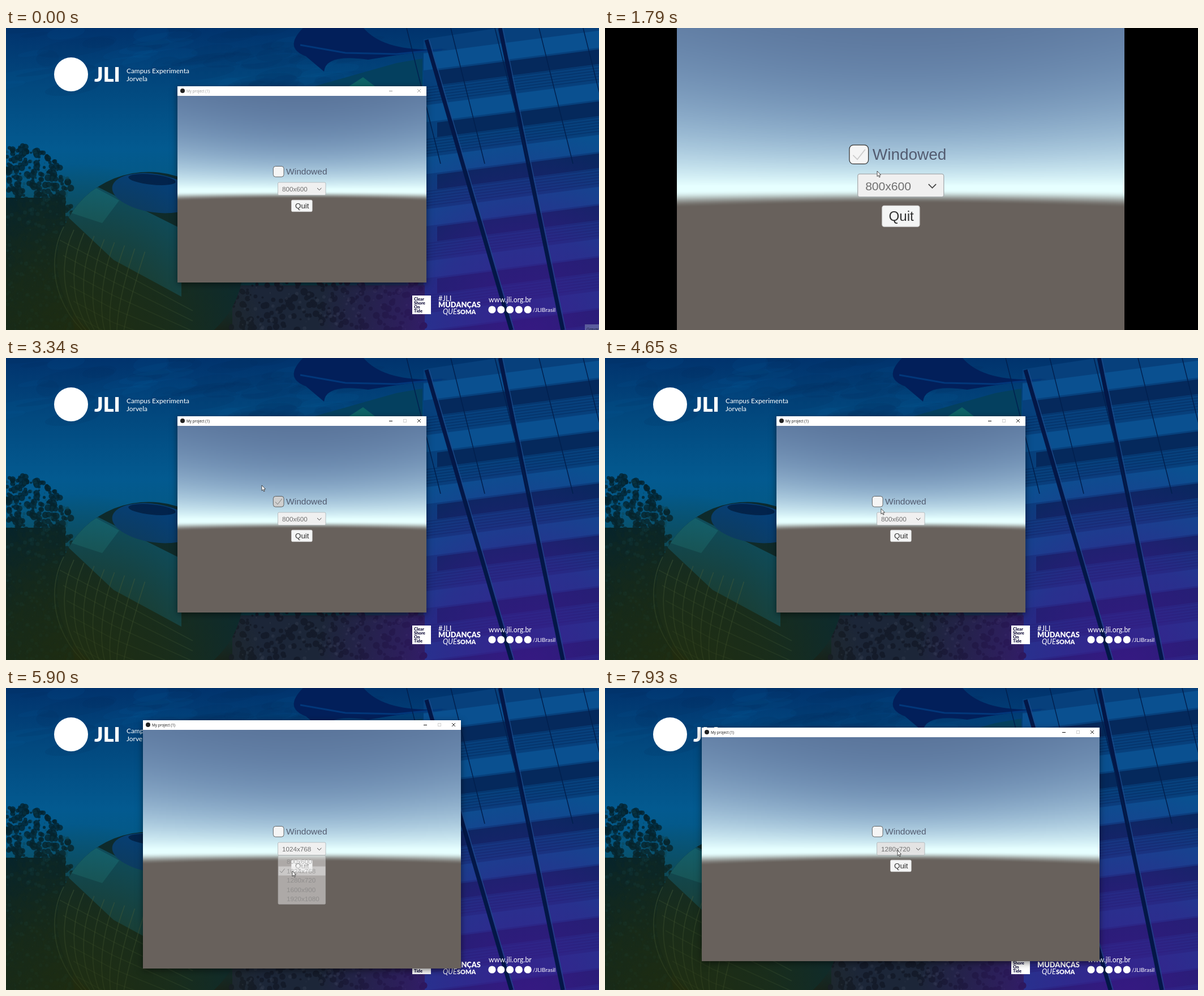
These frames come from a looping animation (1048 by 534 pixels, 8000 ms). An HTML page with a canvas:

```html
<!DOCTYPE html>
<html lang="pt-BR">
<head>
<meta charset="utf-8">
<title>Window settings demo</title>
<style>
html, body { margin: 0; width: 100%; height: 100%; overflow: hidden; background: #000; }
canvas { display: block; }
</style>
</head>
<body>
<canvas id="stage" width="1048" height="534"></canvas>
<script>
const W = 1048, H = 534, LOOP = 8000;
const CX = 522.8, CY = 284.6;      // centre of every app window
const SANS = '"Liberation Sans", Arial, sans-serif';
const LATO = 'Lato, sans-serif';
const stage = document.getElementById('stage').getContext('2d');
let c = stage;

const clamp = v => Math.max(0, Math.min(1, v));
const ramp = (t, a, b) => clamp((t - a) / (b - a));
const mix = (a, b, k) => a + (b - a) * k;
const smooth = k => k * k * (3 - 2 * k);

function text(str, x, y, font, color) {
  c.font = font;
  c.fillStyle = color;
  c.fillText(str, x, y);
}
function rect(x, y, w, h, color) {
  c.fillStyle = color;
  c.fillRect(x, y, w, h);
}
function oval(x, y, rx, ry, color, turn = 0) {
  c.fillStyle = color;
  c.beginPath();
  c.ellipse(x, y, rx, ry, turn, 0, 7);
  c.fill();
}
const disc = (x, y, r, color) => oval(x, y, r, r, color);
function trace(points) {
  c.beginPath();
  for (let i = 0; i < points.length; i += 2) c.lineTo(points[i], points[i + 1]);
}
function poly(color, ...points) {
  trace(points);
  c.fillStyle = color;
  c.fill();
}
function line(color, width, ...points) {
  trace(points);
  c.strokeStyle = color;
  c.lineWidth = width;
  c.stroke();
}
function box(x, y, w, h, r, fill, stroke) {
  c.beginPath();
  c.roundRect(x, y, w, h, r);
  c.fillStyle = fill;
  c.fill();
  c.strokeStyle = stroke;
  c.lineWidth = 0.7;
  c.stroke();
}
function shade(g, ...colors) {
  colors.forEach((color, i) => g.addColorStop(i / (colors.length - 1), color));
  return g;
}
const glow = (x, y, r, color) =>
  rect(0, 0, W, H, shade(c.createRadialGradient(x, y, 0, x, y, r), color + 'cc', color + '88', color + '00'));

// Paints once into an off-screen canvas.
function prepare(w, h, paint) {
  const canvas = document.createElement('canvas');
  canvas.width = w;
  canvas.height = h;
  c = canvas.getContext('2d');
  paint();
  c = stage;
  return canvas;
}

// ---------- desktop wallpaper ----------
let seed = 7;
const rnd = () => (seed = seed * 16807 % 2147483647) / 2147483647;

function foliage(n, x, w, top, color, size) {
  for (let i = 0; i < n; i++) {
    const u = rnd(), y = top(u);
    disc(x + u * w, mix(y, H, rnd()), size * (0.3 + rnd()), color);
  }
}

// A strip of facade that rises towards the right.
const strip = (x, y, h, color) => {
  const rise = (W - x) * 0.13;
  poly(color, x, y, W, y - rise, W, y - rise + h, x, y + h);
};

function building() {
  poly('#07407c', 738, 20, 870, 0, W, 0, W, H, 738, H);
  for (let y = 45; y < 620; y += 92) {
    strip(738, y, 30, '#0a5090');
    strip(762, y + 30, 26, '#05295c');
    for (let k = 0; k < 6; k++) strip(738, y + 60 + k * 5, 1.5, '#04285a88');
  }
}

function globe() {
  c.save();
  c.beginPath();
  c.ellipse(255, 415, 165, 160, 0.3, 0, 7);
  c.clip();
  rect(80, 240, 350, 300, '#0b2a30');
  poly('#0b5068', 150, 275, 310, 355, 310, 475, 190, 410, 105, 330);
  poly('#11667a', 150, 278, 200, 305, 170, 345, 112, 326);
  oval(262, 292, 75, 34, '#063f76', 0.15);
  oval(258, 268, 42, 9, '#02234c', 0.1);
  c.restore();
  c.lineWidth = 1.7;
  c.strokeStyle = '#5f7f6066';
  for (let i = 0; i < 9; i++) {
    c.beginPath();
    c.ellipse(255, 425, 170 - i * 19, 160, 0.3, 1.3, 3.3);
    c.stroke();
  }
  for (let i = 0; i < 6; i++) line('#5f7f6044', 1.5, 95 + i * 6, 375 + i * 27, 190, 425 + i * 24, 330, 500 + i * 18);
}

function flags() {
  poly('#04405f', 545, 103, 690, 62, 736, 54, 736, 103);
  poly('#0c6265', 606, 103, 631, 87, 652, 103);
  c.fillStyle = '#021f5a';
  c.beginPath();
  c.moveTo(525, 0);
  c.quadraticCurveTo(490, 35, 530, 50);
  c.lineTo(562, 77);
  c.quadraticCurveTo(565, 45, 640, 56);
  c.quadraticCurveTo(710, 44, 781, 37);
  c.quadraticCurveTo(670, 45, 632, 0);
  c.fill();
  line('#02377a', 3, 520, 30, 600, 44, 690, 46, 770, 38);
}

function wallpaper() {
  rect(0, 0, W, H, shade(c.createLinearGradient(0, 0, 0, H),
    '#01336d', '#02497f', '#035a90', '#04577c', '#084050', '#131f20'));
  for (let i = 0; i < 70; i++)
    oval(rnd() * 620, rnd() * 110, 20 + rnd() * 50, 4 + rnd() * 11, i % 3 ? '#01285a20' : '#08609e18', -0.15);
  building();
  flags();

  const crown = u => 207 + 75 * u ** 3;
  rect(0, 300, 105, 234, '#06242c');
  foliage(650, 0, 118, crown, '#04232fcc', 5);
  foliage(250, 0, 118, crown, '#0b404f55', 3);
  rect(400, 455, 340, 79, '#1c2638');
  foliage(200, 395, 345, () => 450, '#141b2a', 5);
  foliage(90, 395, 345, () => 450, '#38425555', 3);
  globe();

  glow(130, 570, 330, '#262f08');
  glow(920, 550, 370, '#43158c');
  for (let i = 0; i < 2; i++) {
    const x = 743 + i * 130, y = 21 - i * 21;
    line('#031747', 7, x, y, x + 150 - i * 39, H);
    line('#1c4a8a', 1.2, x + 5, y, x + 155 - i * 39, H);
  }
  for (let x = 708; x < W; x += 78) line('#02204f', 1.5, x, 0, x + 60, 240);

  branding();
}

function branding() {
  disc(115, 82, 30, '#fff');
  text('JLI', 156, 95, '900 36px ' + LATO, '#fff');
  text('Campus Experimenta', 213, 79.5, '11.9px ' + LATO, '#fff');
  text('Jorvela', 213, 94, '11.9px ' + LATO, '#fff');

  rect(718, 473, 33, 33, '#fff');
  ['Clear', 'Shore', 'On', 'Tide'].forEach((s, i) =>
    text(s, 721, 481.5 + i * 7.2, '900 7.6px ' + LATO, '#17143f'));
  text('#JLI', 764, 483, '13px ' + LATO, '#fff');
  text('MUDANÇAS', 764, 494, '900 12.8px ' + LATO, '#fff');
  text('QUE', 772, 506, 'italic 12.5px ' + LATO, '#fff');
  text('SOMA', 797, 506, '900 11px ' + LATO, '#fff');
  text('www.jli.org.br', 853, 484.5, '12.4px ' + LATO, '#fff');
  for (let i = 0; i < 5; i++) disc(859 + i * 15.8, 498, 6.6, '#fff');
  text('/JLIBrasil', 931, 501.5, '10px ' + LATO, '#fff');
}

// ---------- sky ----------
const SKY_H = 600, SPAN = 0.6;     // the column covers -SPAN..SPAN view heights

// Haze decays exponentially above the horizon; the ground is flat.
function skyColor(u) {
  const haze = (zenith, bright, decay) => mix(zenith, bright, Math.exp(Math.min(0, u) / decay));
  const k = smooth(ramp(u, 0.012, 0.052));
  return `rgb(${mix(haze(83, 230, 0.17), 104, k)},${mix(haze(105, 255, 0.2), 97, k)},${mix(haze(138, 255, 0.26), 92, k)})`;
}

const desk = prepare(W, H, wallpaper);
const column = prepare(1, SKY_H, () => {
  for (let y = 0; y < SKY_H; y++) rect(0, y, 1, 1, skyColor(mix(-SPAN, SPAN, (y + 0.5) / SKY_H)));
});

// Equal elevation angles bow away from the horizon towards the sides.
function sky(cx, cy, w, h) {
  const from = Math.round(cx - w / 2), to = Math.round(cx + w / 2), top = Math.round(cy - h / 2);
  c.save();
  c.beginPath();
  c.rect(from, top, to - from, Math.round(h));
  c.clip();
  for (let x = from; x < to; x += 4) {
    const reach = SPAN * h * Math.hypot(1, (x + 2 - cx) / (0.866 * h));
    c.drawImage(column, 0, 0, 1, SKY_H, x, cy - reach, 4, 2 * reach);
  }
  c.restore();
}

// ---------- timeline ----------
const SIZES = ['800x600', '1024x768', '1280x720', '1600x900', '1920x1080'];
const HOLD = 130;
const CLICKS = [1660, 3200, 4930, 5760, 6600, 7440];
const [GO_FULL, GO_BACK, OPEN_A, PICK_A, OPEN_B, PICK_B] = CLICKS;
const rowY = i => 307 + i * 16.5;

// start, end, x, y
const MOVES = [
  [340, 1240, 481, 253], [2180, 2470, 452, 225], [3890, 4100, 481, 253],
  [4650, 4860, 498, 286], [5190, 5610, 506, rowY(1)], [6040, 6530, 518, 287],
  [6740, 7370, 518, rowY(2)], [7650, 7930, 517, 287]
];

function pointer(t) {
  let x = 835, y = 490;
  for (const [a, b, tx, ty] of MOVES) {
    if (t < a) break;
    const n = Math.round((b - a) / 70) + 1;
    const step = Math.min(n, Math.floor((t - a) / (b - a) * (n - 1) + 0.1) + 1);
    const k = 1 - (1 - step / n) ** 1.8;
    x = mix(x, tx, k);
    y = mix(y, ty, k);
  }
  return [x, y];
}

// ---------- scene parts ----------
function appWindow(size, active) {
  const [w, h] = size.split('x').map(v => v * 0.5494);
  const x = Math.round(CX - w / 2), y = Math.round(CY - h / 2) - 17;
  const r = Math.round(CX + w / 2), m = y + 8;
  c.save();
  c.shadowColor = 'rgba(0,0,0,.5)';
  c.shadowBlur = 11;
  c.shadowOffsetY = 3;
  rect(x, y, r - x, h + 17, '#fff');
  c.restore();
  sky(CX, CY, w, h);
  const ink = active ? '#111' : '#999';
  disc(x + 9, m, 4, '#222');
  text('My project (1)', x + 16, m + 2.5, '6.45px "Open Sans", sans-serif', ink);
  line(ink, 1, r - 66, m + 0.5, r - 60, m + 0.5);
  if (active) {
    c.strokeStyle = '#d0d0d0';
    c.strokeRect(r - 40.5, m - 2.5, 5, 5);
  }
  line(ink, 0.9, r - 16, m - 3, r - 10, m + 3);
  line(ink, 0.9, r - 10, m - 3, r - 16, m + 3);
}

const tick = (x, y, k, color) =>
  line(color, 1, x - 4 * k, y, x - k, y + 3 * k, x + 4.5 * k, y - 4 * k);

function controls(t, px, py, size) {
  const pulse = a => ramp(t, a - 10, a + 70) - ramp(t, a + 110, a + 210);
  const checked = ramp(t, GO_FULL + 100, GO_FULL + 260) - ramp(t, GO_BACK + 70, GO_BACK + 210);
  const v = mix(245, 190, pulse(GO_BACK));
  box(472.3, 244.5, 18.7, 18.7, 4, `rgb(${v},${v},${v})`, '#333');
  if (checked > 0) tick(481.5, 254.5, 1.4, `rgba(35,35,35,${checked})`);
  text('Windowed', 495, 259, '15.55px ' + SANS, 'rgba(50,50,70,.72)');

  const hover = t > GO_FULL && px > 480 && px < 565 && py > 273 && py < 296;
  box(480.5, 273, 84.5, 22.5, 2, hover ? '#e3e3e3' : '#f0f0f0', '#a5a9ac');
  text(size, 488, 289, '11.7px ' + SANS, '#707070');
  line('#444', 1, 550, 283, 553.7, 286.7, 557.4, 283);

  box(504.5, 304.2, 36.7, 20.5, 2, '#f4f5f5', '#d8d8d8');
  text('Quit', 511, 319, '13.4px ' + SANS, '#323232');
}

function menu(t, py, size) {
  const shown = (open, pick) => ramp(t, open + 90, open + 210) - ramp(t, pick + 70, pick + 210);
  c.save();
  c.globalAlpha = shown(OPEN_A, PICK_A) + shown(OPEN_B, PICK_B);
  box(480.8, 296, 84, 86.5, 2, '#f3f3f3', '#9a9a9a');
  SIZES.forEach((item, i) => {
    const y = rowY(i);
    if (Math.abs(py - y) < 8.2) rect(481.5, y - 8, 83, 16, '#e6e6e6');
    text(item, 496, y + 4.3, '11.7px ' + SANS, '#727272');
    if (item === size) tick(488, y, 1, '#444');
  });
  c.restore();
}

function cursor(x, y) {
  c.save();
  c.translate(x, y);
  trace([0, 0, 0, 9.5, 2.2, 7.6, 3.7, 11, 5.2, 10.3, 3.8, 7, 6.5, 6.8]);
  c.closePath();
  c.fillStyle = '#fff';
  c.fill();
  c.strokeStyle = '#222';
  c.lineWidth = 0.8;
  c.stroke();
  c.restore();
}

function draw(t) {
  const chosen = delay => SIZES[(t >= PICK_A + delay) + (t >= PICK_B + delay)];
  const [px, py] = pointer(t);

  c.save();
  if (t >= GO_FULL + HOLD && t < GO_BACK + HOLD) {
    rect(0, 0, W, H, '#000');
    sky(CX, 279, 791, 593);
    c.translate(CX, 279);
    c.scale(1.8, 1.8);
    c.translate(-CX, -CY);
  } else {
    c.drawImage(desk, 0, 0);
    appWindow(chosen(HOLD), t >= GO_FULL);
  }
  controls(t, px, py, chosen(70));
  menu(t, py, chosen(70));
  c.restore();

  if (t < 70) {
    rect(1023, 524, 25, 10, 'rgba(130,140,180,.55)');
    text('Gravar', 1026, 535, '7px ' + SANS, '#1d2440');
  }
  if (CLICKS.some(a => t >= a && t < a + HOLD)) disc(px, py + 0.5, 8, 'rgba(228,216,60,.55)');
  if (t >= 270) cursor(px, py);
}

const start = performance.now();
function frame() {
  draw((performance.now() - start) % LOOP);
  requestAnimationFrame(frame);
}
frame();
</script>
</body>
</html>
```
